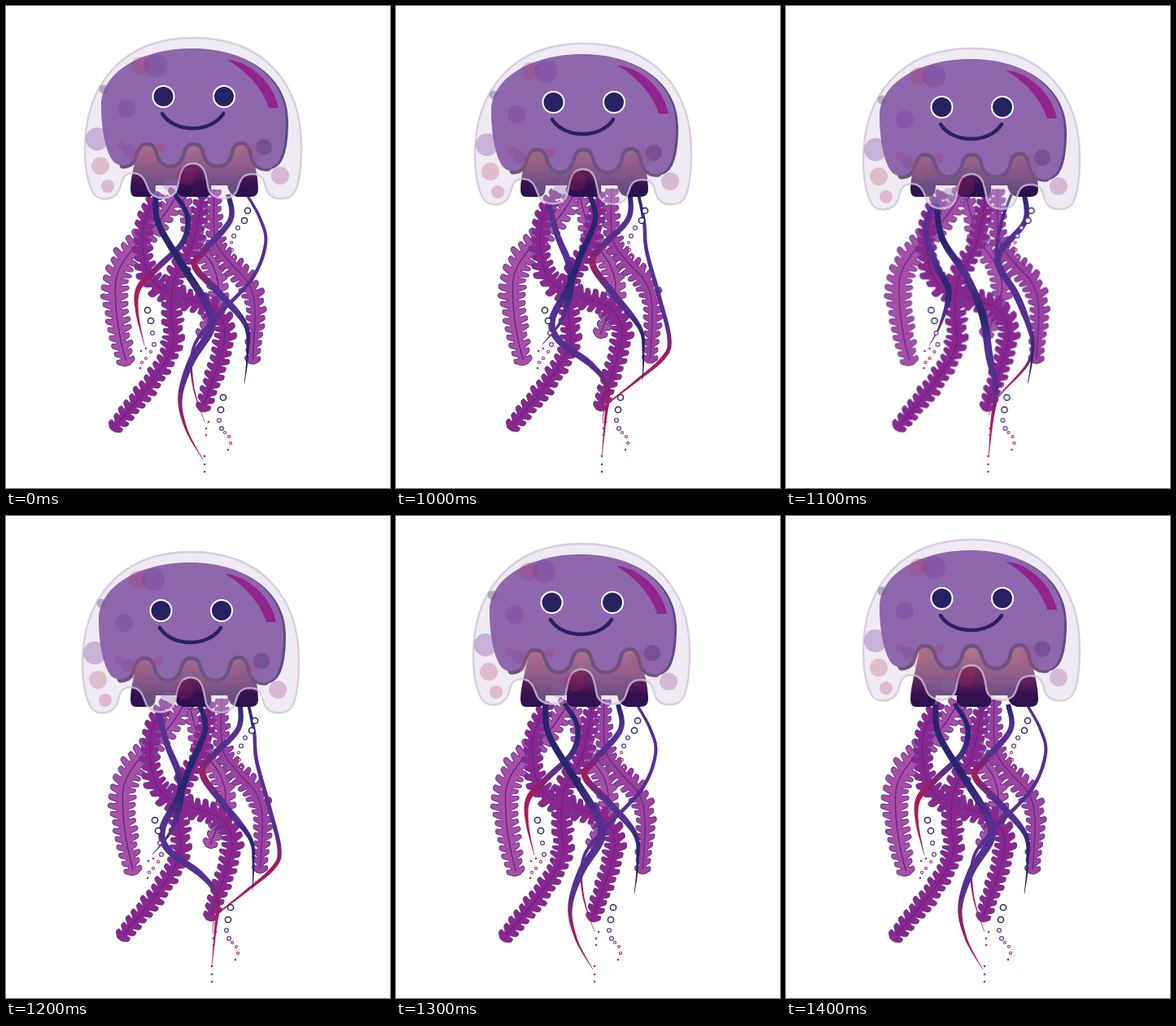
Write an HTML page that moves like this. It is 472 px wide and 591 px high and loops after 1500 ms.

```html
<!DOCTYPE html>
<html lang="en">
<head>
<meta charset="utf-8">
<title>Jellyfish</title>
<style>
html, body { margin: 0; width: 100%; height: 100%; overflow: hidden; background: #fff; }
svg { display: block; width: 100vw; height: 100vh; }
</style>
</head>
<body>
<svg viewBox="0 0 472 591" preserveAspectRatio="none">
  <defs>
    <linearGradient id="skirtFill" gradientUnits="userSpaceOnUse" x1="0" y1="165" x2="0" y2="234">
      <stop offset="0" stop-color="#9a4a66"/>
      <stop offset=".45" stop-color="#6a2860"/>
      <stop offset=".78" stop-color="#37104f"/>
      <stop offset="1" stop-color="#29114f"/>
    </linearGradient>
    <path id="bell" d="M117,122C117,82 165,52 230,52C296,52 344,88 344,140C344,168 340,186 332,194
      C322,204 307,199 304,186C301,170 296,166 290,166C280,166 277,172 275,182C271,199 249,199 245,182
      C242,170 238,167 230,167C221,167 218,174 216,182C211,199 193,199 188,182C185,171 181,167 173,167
      C163,167 160,176 157,186C153,198 136,198 130,188C122,175 117,150 117,122Z"/>
  </defs>
  <g id="arms"></g>
  <g id="ribbons"></g>
  <path fill="url(#skirtFill)" d="M166,150H296C300,180 310,200 310,225Q310,234 300,234H284Q274,232 272,220H252
    Q254,234 244,234H220Q208,234 210,220H184Q184,234 175,234H160Q153,234 153,225C153,205 163,180 166,150Z"/>
  <g id="body">
    <path fill="#d4c3dd" fill-opacity=".35" stroke="#d2c2e0" stroke-opacity=".8" stroke-width="2.4"
      d="M97,176C97,98 142,39 230,39C320,39 363,98 363,172C363,198 361,216 355,228C349,239 329,239 322,229
      C317,220 319,206 303,206C286,206 288,219 283,228C277,239 254,239 249,225C246,212 246,193 230,193
      C213,193 214,212 210,225C205,239 181,239 175,225C171,214 168,205 156,205C142,205 143,217 139,226
      C133,239 113,240 107,229C100,216 97,196 97,176Z"/>
    <use href="#bell" x="3" y="1" fill="#5d4a8a"/>
    <path fill="none" stroke="#6e5580" stroke-width="9" stroke-linecap="round"
      d="M322,198C313,199 306,194 304,186C301,170 296,166 290,166C280,166 277,172 275,182C271,199 249,199 245,182
      C242,170 238,167 230,167C221,167 218,174 216,182C211,199 193,199 188,182C185,171 181,167 173,167
      C163,167 160,176 157,186C155,193 149,195 144,195"/>
    <use href="#bell" fill="#8f67ac"/>
    <path fill="#92248d" d="M272,66C297,67 328,91 335,125H323C317,104 297,80 272,66Z"/>
    <g id="spots"></g>
    <g fill="#272262" stroke="#fff" stroke-width="2">
      <circle cx="193.500" cy="111" r="13"/>
      <circle cx="268" cy="111" r="13"/>
    </g>
    <path fill="none" stroke="#2a2162" stroke-width="4.500" stroke-linecap="round" d="M192,132C207,156 252,156 267,132"/>
  </g>
  <g id="bubbles"></g>
</svg>
<script>
const NS = 'http://www.w3.org/2000/svg';
const $ = id => document.getElementById(id);
const NAVY = '#28256c', PURPLE = '#55308f', RED = '#a51c5c';

function add(parent, tag, attrs) {
  const el = document.createElementNS(NS, tag);
  for (const k in attrs) el.setAttribute(k, attrs[k]);
  return parent.appendChild(el);
}

let seed = 7;
const rnd = () => (seed = seed * 16807 % 2147483647) / 2147483647;

// "x,y x,y ..." to a smooth curve that can be read by arc length
function curve(text) {
  const p = text.split(' ').map(q => q.split(',').map(Number));
  const pts = [];
  for (let i = 0; i < p.length - 1; i++) {
    const a = p[i - 1] || p[i], b = p[i], c = p[i + 1], d = p[i + 2] || c;
    for (let k = 0; k < 20; k++) {
      const t = k / 20;
      pts.push([0, 1].map(j => b[j] + t * ((c[j] - a[j]) / 2 +
        t * (a[j] - 2.5 * b[j] + 2 * c[j] - d[j] / 2 + t * (1.5 * (b[j] - c[j]) + (d[j] - a[j]) / 2)))));
    }
  }
  pts.push(p[p.length - 1]);
  const len = [0];
  for (let i = 1; i < pts.length; i++)
    len.push(len[i - 1] + Math.hypot(pts[i][0] - pts[i - 1][0], pts[i][1] - pts[i - 1][1]));
  const total = len[len.length - 1];
  // point at distance s, moved sideways by off
  const at = (s, off = 0) => {
    let i = 1;
    while (i < pts.length - 1 && len[i] < s) i++;
    const [x0, y0] = pts[i - 1], [x1, y1] = pts[i], d = len[i] - len[i - 1] || 1;
    const t = (s - len[i - 1]) / d, ux = (x1 - x0) / d, uy = (y1 - y0) / d;
    return [x0 + (x1 - x0) * t - uy * off, y0 + (y1 - y0) * t + ux * off];
  };
  return { total, at };
}

const fmt = p => p[0].toFixed(1) + ',' + p[1].toFixed(1);

function smoothLoop(pts) {
  const mid = (a, b) => [(a[0] + b[0]) / 2, (a[1] + b[1]) / 2];
  let d = 'M' + fmt(mid(pts[pts.length - 1], pts[0]));
  pts.forEach((p, i) => d += 'Q' + fmt(p) + ' ' + fmt(mid(p, pts[(i + 1) % pts.length])));
  return d + 'Z';
}

// frilled arm: rounded lobes on both sides of a spine
function arm(parent, text, width, fill) {
  const { total, at } = curve(text);
  const n = Math.round(total / 10), step = total / n;
  const side = dir => {
    const out = [];
    for (let i = 0; i < n; i++) {
      const u = (i + .5) / n;
      const w = width * (.62 + .42 * Math.sin(Math.PI * Math.min(1, u * .95))) * (.85 + .3 * rnd());
      const lean = -2;
      [[.04, .42], [.12, .5], [.2, .95], [.36, 1.06], [.68, 1.06], [.82, .92], [.86, .5], [.96, .42]].forEach(([k, o]) => {
        const s = (i + k) * step + (o > .6 ? lean : 0);
        out.push(at(Math.max(0, s), dir * w * o));
      });
    }
    return out;
  };
  add(parent, 'path', {
    d: smoothLoop([...side(1), at(total, 0), ...side(-1).reverse()]),
    fill, stroke: '#5e3a9a', 'stroke-width': 1.1, 'stroke-linejoin': 'round'
  });
  let d = '';
  for (let i = 0; i <= 40; i++) d += (i ? 'L' : 'M') + fmt(at(total * i / 41));
  add(parent, 'path', { d, fill: 'none', stroke: '#4f2f92', 'stroke-width': 1.4 });
}

// tapered ribbon with evenly spaced colours from top to bottom
let gradients = 0;
function ribbon(parent, text, width, colours) {
  const { total, at } = curve(text);
  const left = [], right = [];
  let top = 1e3, low = 0;
  for (let i = 0; i <= 60; i++) {
    const u = i / 60;
    const w = width / 2 * (.75 + .35 * Math.sin(Math.PI * u)) * Math.min(1, 2.8 * (1 - u)) + .3;
    left.push(at(total * u, w));
    right.unshift(at(total * u, -w));
    const y = at(total * u)[1];
    top = Math.min(top, y);
    low = Math.max(low, y);
  }
  const id = 'tone' + gradients++;
  const g = add(parent, 'linearGradient', { id, gradientUnits: 'userSpaceOnUse', x1: 0, y1: top, x2: 0, y2: low });
  [...colours].forEach((c, i) => add(g, 'stop', {
    offset: i / (colours.length - 1),
    'stop-color': { n: NAVY, p: PURPLE, r: RED }[c]
  }));
  add(parent, 'path', { d: 'M' + left.concat(right).map(fmt).join('L') + 'Z', fill: `url(#${id})` });
}

const DARK = '#90258c', LIGHT = '#ab4fa4', MID = '#a0409b';
const ARMS = [
  ['215,228 232,285 255,320 260,355 240,408', 12, LIGHT],
  ['212,228 193,258 158,295 137,328 135,365 140,405 149,441', 15, LIGHT],
  ['256,225 257,285 275,314 298,340 306,372 303,439', 12, MID],
  ['188,228 170,265 169,305 182,340 220,358 255,372 269,398 262,435 240,497', 13, DARK],
  ['242,228 230,290 207,335 203,380 205,415 180,460 130,520', 12.5, DARK]
];
ARMS.forEach(a => arm($('arms'), ...a));

// per pose: path, width, colours
const POSES = {
  a: [
    ['207,230 223,258 217,290 185,322 163,346 161,375 170,416', 6, 'nnprrr'],
    ['296,231 313,262 319,292 302,335 255,385 230,420 230,465 244,510', 3.6, 'ppppprr'],
    ['273,231 276,262 244,300 232,319 262,352 294,390 297,425 293,463', 7, 'npprppnnn'],
    ['184,231 187,266 215,315 247,367 252,396 228,435 214,480 222,520 242,556', 8, 'nnnppprr']
  ],
  b: [
    ['187,238 198,280 213,318 214,350 203,386 180,415', 7, 'pppnpp'],
    ['298,231 305,265 308,300 323,355 336,408 328,432 290,464 259,490 254,512', 4.2, 'npppprrr'],
    ['288,231 285,262 250,298 242,318 268,354 300,395 304,425 303,459', 7, 'npprppnnn'],
    ['238,231 245,262 227,305 212,345 192,384 200,410 240,440 260,468 257,510 253,552', 7, 'nnnnppprrr']
  ],
  c: [
    ['184,235 172,275 185,318 200,350 190,390 176,416', 6.5, 'pppnpr'],
    ['277,231 264,268 260,310 282,356 302,402 298,437 262,478 249,502', 3.8, 'npppprr'],
    ['293,231 294,264 264,300 262,320 284,356 302,405 302,435 297,463', 7, 'npppppnn'],
    ['185,242 192,285 222,332 242,380 250,430 258,468 253,510 249,553', 8, 'nnpnpprr']
  ]
};
const poseGroups = {};
for (const name in POSES) {
  const g = poseGroups[name] = add($('ribbons'), 'g', {});
  POSES[name].forEach(r => ribbon(g, ...r));
}

// chains of bubbles shrinking from navy rings to red dots
const CHAINS = [
  '174,373 178,386 180,401 182,415 178,424 172,432 167,437 165,444 172,420 166,423',
  '267,480 264,495 262,508 265,518 269,523 274,528 276,536 273,544',
  '297,251 293,263 285,272 280,282 277,290 278,299 280,308 287,316'
];
function bubble([x, y], r, stroke, width) {
  add($('bubbles'), 'circle', { cx: x, cy: y, r, fill: r > 1 ? '#fff' : stroke, stroke, 'stroke-width': width });
}
const points = text => text.split(' ').map(q => q.split(','));
CHAINS.forEach(c => points(c).forEach((p, i) => {
  if (i < 2) bubble(p, 3.6, NAVY, 1.5);
  else if (i < 4) bubble(p, 2.4, '#64409c', 1.3);
  else if (i < 7) bubble(p, 1.5, RED, 1.1);
  else bubble(p, .9, RED, 1);
}));
points('249,510 246,518 246,526 244,552 244,562 244,571').forEach(p => bubble(p, .9, RED, 1));

const SPOTS = [
  [165, 73, 11, '#b04070', .3], [184, 73, 14, '#6d3a98', .28], [120, 102, 5.500, '#6b6088', .45],
  [148, 126, 11, '#6d3a98', .28], [112, 163, 14, '#8c60ac', .4], [116, 196, 11, '#b86080', .32],
  [125, 221, 8, '#b86080', .34], [142, 171, 5.500, '#a04078', .28], [152, 178, 8, '#7a3f98', .28],
  [168, 184, 14, '#a86078', .22], [190, 173, 5.500, '#a8407a', .35], [222, 208, 12, '#a02858', .28],
  [202, 219, 9, '#8a70aa', .3], [317, 173, 10, '#503478', .42], [301, 181, 13, '#94507f', .22],
  [337, 208, 11, '#b070a8', .4]
];
SPOTS.forEach(([cx, cy, r, fill, o]) => add($('spots'), 'circle', { cx, cy, r, fill, 'fill-opacity': o }));

// time, body x, body y, pose
const LOOP = 1500;
const STEPS = [
  [0, 0, 0, 'a'], [1000, 0, 7, 'b'], [1100, -2, 13, 'c'],
  [1200, -3, 5, 'b'], [1300, -2, -5, 'a'], [1400, -2, -10, 'a']
];
const SWAY = { a: [0, 0], b: [9, -1], c: [4.5, -.5] };

function play(el, style) {
  const frames = STEPS.map(s => ({ ...style(s), offset: s[0] / LOOP, easing: 'step-end' }));
  frames.push({ ...style(STEPS[STEPS.length - 1]), offset: 1 });
  el.animate(frames, { duration: LOOP, iterations: Infinity }).startTime = 0;
}
const move = (x, y) => ({ transform: `translate(${x}px, ${y}px)` });

play($('body'), s => move(s[1], s[2]));
play($('arms'), s => move(...SWAY[s[3]]));
play($('bubbles'), s => move(SWAY[s[3]][0], 0));
for (const name in poseGroups)
  play(poseGroups[name], s => ({ visibility: s[3] === name ? 'visible' : 'hidden' }));
</script>
</body>
</html>
```
